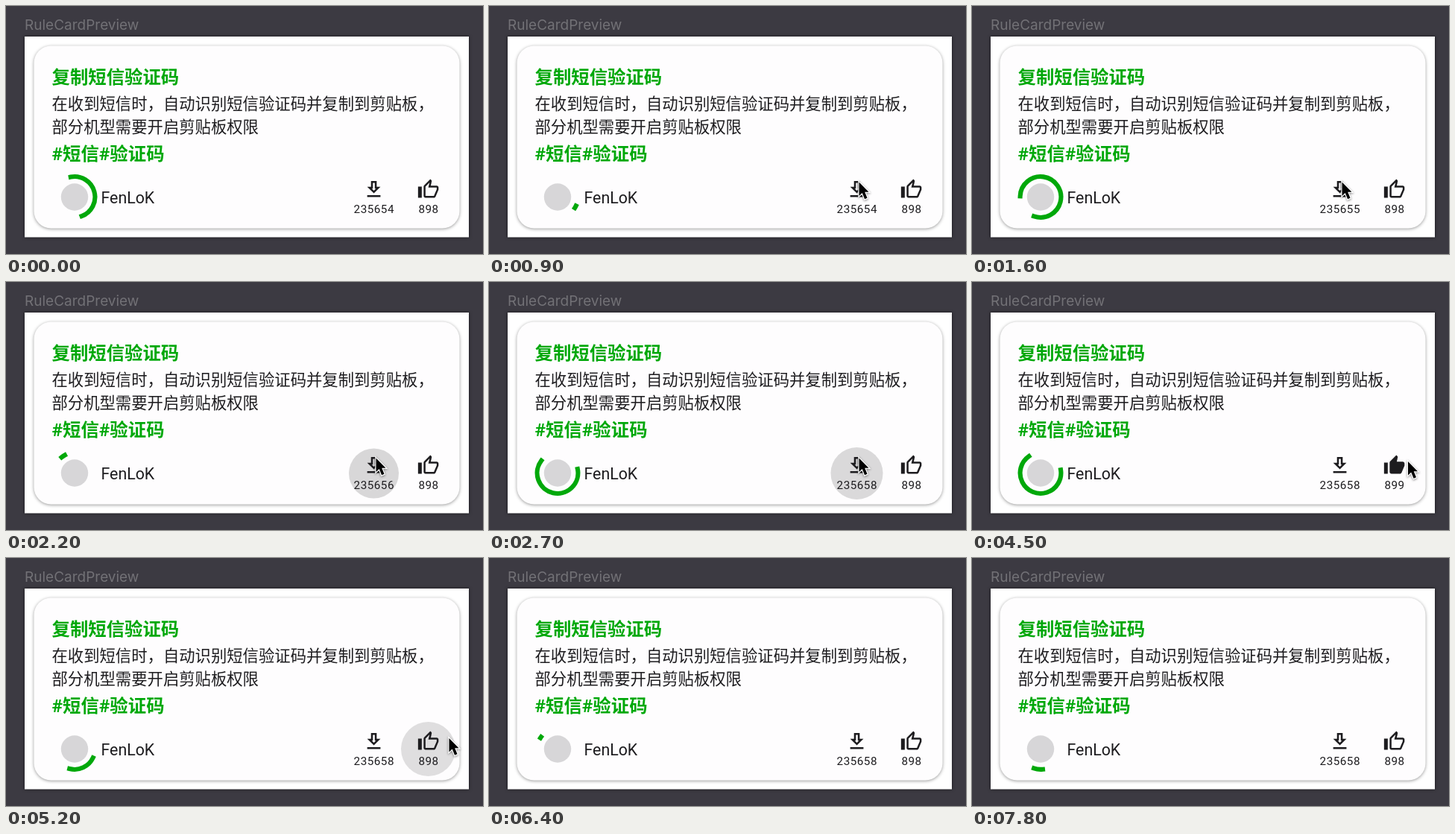
Write an HTML page that moves like this. It is 640 px wide and 333 px high and loops after 7900 ms.

```html
<!DOCTYPE html>
<html lang="zh-CN">
<head>
<meta charset="utf-8">
<style>
html, body { margin: 0; width: 100%; height: 100%; overflow: hidden; background: #3c3a42; }
svg { display: block; }
text { font-family: Roboto, "Noto Sans CJK SC", "Noto Sans CJK", sans-serif; fill: #1d1c1f; }
.label { font: 19px Inter, sans-serif; fill: #727176; }
.head { font-size: 24.4px; font-weight: 700; fill: #00a80a; }
.body { font-size: 21.35px; }
.count { font-size: 15.25px; letter-spacing: .5px; text-anchor: middle; }
.page { filter: drop-shadow(0 0 2px #0009); }
.card { filter: drop-shadow(0 1px 2px #0006); }
#cursor { filter: drop-shadow(0 1px 1.5px #0007); }
</style>
</head>
<body>
<svg width="640" height="333" viewBox="0 0 640 333">
  <text class="label" x="25" y="32">RuleCardPreview</text>
  <rect class="page" x="25" y="41" width="596" height="269.5" fill="#fff"/>
  <rect class="card" x="37.5" y="53.5" width="571" height="245" rx="23" fill="#fefdfe"/>
  <text class="head" x="61.5" y="103.5">复制短信验证码</text>
  <text class="body" x="61.5" y="139">在收到短信时，自动识别短信验证码并复制到剪贴板，</text>
  <text class="body" x="61.5" y="169.5">部分机型需要开启剪贴板权限</text>
  <text class="head" x="61.5" y="207">#短信#验证码</text>
  <circle cx="92" cy="256.5" r="18.2" fill="#d7d6d8"/>
  <path id="ring" fill="none" stroke="#00a80a" stroke-width="6.1" stroke-linecap="square"/>
  <text class="body" x="127.5" y="265">FenLoK</text>
  <g id="ripples"></g>
  <g fill="#1d1c1f">
    <path transform="translate(478.3 231.2) scale(1.27)" d="M19 9h-4V3H9v6H5l7 7 7-7zm-8 2V5h2v6h1.17L12 13.17 9.83 11H11zm-6 7h14v2H5z"/>
    <path id="thumb" fill-rule="evenodd" transform="translate(551.6 231.2) scale(1.25)"/>
  </g>
  <text class="count" id="downloads" x="493.8" y="278"></text>
  <text class="count" id="likes" x="567" y="278"></text>
  <path id="cursor" d="M0 0V18.5L4.2 14.6 7.6 22.8 11 21.3 7.7 13.3H13Z" stroke="#fff" stroke-width="2.4" paint-order="stroke"/>
</svg>
<script>
const $ = id => document.getElementById(id);
const clamp = v => Math.min(1, Math.max(0, v));
const LOOP = 7900, STEP = 100, SPIN = 1332;

const THUMB = "M1 9h4v12H1zM9 21h9c.83 0 1.54-.5 1.84-1.22l3.02-7.05c.09-.23.14-.47.14-.73v-2c0-1.1-.9-2-2-2h-6.31l.95-4.57.03-.32c0-.41-.17-.79-.44-1.06L14.17 1 7.58 7.59C7.22 7.95 7 8.45 7 9v10c0 1.1.9 2 2 2z";
const THUMB_HOLE = "M9 9l4.34-4.34L12 10h9v2l-3 7H9z";

// [press, release] times per button
const buttons = [
  { x: 493.5, y: 257, r: 35, clicks: [[1050, 1280], [1650, 1870], [2050, 2280], [2450, 2690]] },
  { x: 566.5, y: 256.5, r: 36.5, clicks: [[3820, 4080], [4900, 5170]] }
];
// [time, x, y] of the pointer tip
const track = [
  [100, 551, 325], [800, 496.5, 236.5], [2800, 496.5, 236.5], [3200, 592, 243],
  [3450, 600, 246], [3750, 585, 241], [4800, 585, 241], [5200, 594.5, 242],
  [5400, 606, 232], [5600, 595.5, 219]
];

for (const b of buttons) {
  b.ripple = document.createElementNS("http://www.w3.org/2000/svg", "circle");
  $("ripples").append(b.ripple);
}

// cubic-bezier(.4, 0, .2, 1), solved by bisection
function ease(x) {
  let lo = 0, hi = 1;
  for (let i = 0; i < 20; i++) {
    const s = (lo + hi) / 2, r = 1 - s;
    if (1.2 * s * r * r + .6 * s * s * r + s ** 3 < x) lo = s; else hi = s;
  }
  return lo * lo * (3 - 2 * lo);
}

function drawRing(t) {
  const time = 3 * SPIN + (t ? t + 304 : 258);
  const turn = Math.floor(time / SPIN), p = time % SPIN, half = SPIN / 2;
  const head = 290 * ease(clamp(p / half));
  const tail = 290 * ease(clamp(p / half - 1));
  const base = turn * 216 + 286 * p / SPIN - 90 + 5.73;
  const sweep = Math.max(head - tail, .1);
  const at = deg => {
    const a = deg * Math.PI / 180;
    return `${92 + 27.4 * Math.cos(a)} ${256.5 + 27.4 * Math.sin(a)}`;
  };
  $("ring").setAttribute("d",
    `M${at(base + tail)}A27.4 27.4 0 ${+(sweep > 180)} 1 ${at(base + tail + sweep)}`);
}

function drawRipple(b, t) {
  const click = b.clicks.findLast(c => c[0] <= t);
  let alpha = 0;
  if (click) {
    const [press, release] = click;
    alpha = .15 * clamp((t - press) / 75) * clamp(1 - (t - release) / 150);
    b.ripple.setAttribute("r", b.r * (.45 + .55 * ease(clamp((t - press) / 225))));
  }
  b.ripple.setAttribute("cx", b.x);
  b.ripple.setAttribute("cy", b.y);
  b.ripple.setAttribute("opacity", alpha);
}

function drawCursor(t) {
  const i = track.findLastIndex(k => k[0] <= t);
  const last = track.length - 1;
  const shown = i >= 0 && t <= track[last][0];
  $("cursor").style.display = shown ? "" : "none";
  if (!shown) return;
  const a = track[i], b = track[Math.min(i + 1, last)];
  const u = clamp((t - a[0]) / (b[0] - a[0] || 1)), s = u * u * (3 - 2 * u);
  $("cursor").setAttribute("transform",
    `translate(${a[1] + (b[1] - a[1]) * s} ${a[2] + (b[2] - a[2]) * s})`);
}

function draw(now) {
  const t = Math.floor(now % LOOP / STEP) * STEP;
  const [downloads, likes] = buttons.map(b => b.clicks.filter(c => c[1] <= t).length);
  const liked = likes % 2;
  drawRing(t);
  buttons.forEach(b => drawRipple(b, t));
  drawCursor(t);
  $("downloads").textContent = 235654 + downloads;
  $("likes").textContent = 898 + liked;
  $("thumb").setAttribute("d", liked ? THUMB : THUMB + THUMB_HOLE);
}

const start = performance.now();
function frame() {
  draw(performance.now() - start);
  requestAnimationFrame(frame);
}
frame();
</script>
</body>
</html>
```
